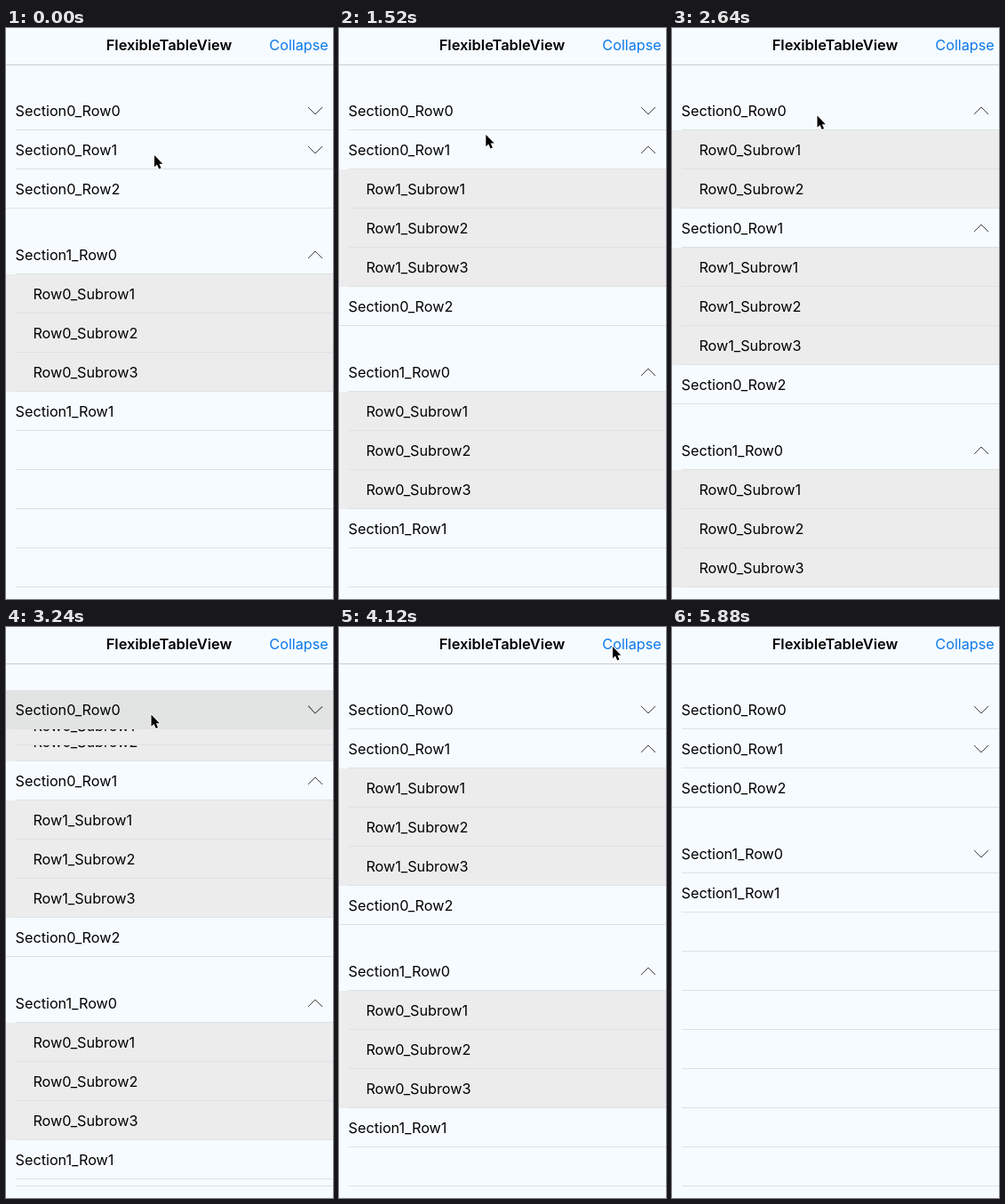
An HTML page with a canvas for the animation above (5920 ms loop, 368 by 642 pixels).

```html
<!DOCTYPE html>
<html lang="en">
<head>
<meta charset="utf-8">
<title>FlexibleTableView</title>
<style>
html, body { margin: 0; width: 100%; height: 100%; overflow: hidden; background: #f6fbff; }
canvas { display: block; }
</style>
</head>
<body>
<canvas id="stage" width="368" height="642"></canvas>
<script>
const ctx = document.getElementById('stage').getContext('2d');
const W = 368, H = 642, ROW = 44, LOOP = 5920;
const BG = '#f6fbff', GRAY = '#ececec', LINE = '#dde1e5', INK = '#000';
const FAMILY = 'Inter, "Liberation Sans", sans-serif';
const FONT = '16.2px ' + FAMILY, BOLD = '600 16.4px ' + FAMILY;

// A row with children opens at `on` and closes at `off`.
const sections = [
  [
    { subs: 2, on: 2162, off: 3075, taps: [2162, 3075] },
    { subs: 3, on: 547, off: 4541, taps: [547] },
    { subs: 0 }
  ],
  [
    { subs: 3, on: -1000, off: 4541, taps: [] },
    { subs: 0 }
  ]
];

// Pointer tip: time, x, y
const path = [
  [0, 167, 143], [300, 167, 143], [500, 167, 140], [1300, 167, 140],
  [1750, 163.5, 98.5], [3450, 163.5, 98.5], [4080, 308, 22], [4400, 308, 22],
  [4540, 312, 22], [5000, 312, 22], [5240, 330, -20]
];

const clamp = v => Math.min(1, Math.max(0, v));

// cubic-bezier(.42, 0, .58, 1)
function ease(x) {
  if (x <= 0 || x >= 1) return clamp(x);
  let lo = 0, hi = 1, s = 0.5;
  for (let i = 0; i < 20; i++) {
    s = (lo + hi) / 2;
    const bx = 1.26 * s * (1 - s) ** 2 + 1.74 * s * s * (1 - s) + s ** 3;
    if (bx < x) lo = s; else hi = s;
  }
  return s * s * (3 - 2 * s);
}

const since = (t, start, length) => ease((t - start) / length);
const openness = (row, t) => since(t, row.on, 300) - since(t, row.off, 300);
// The chevron turns faster, and starts back just before the rows close.
const turned = (row, t) => since(t, row.on, 200) - since(t, row.off - 18, 200);

function rect(x, y, w, h, color) {
  ctx.fillStyle = color;
  ctx.fillRect(x, y, w, h);
}

function text(str, x, y, color = INK, font = FONT, align = 'left') {
  ctx.font = font;
  ctx.textAlign = align;
  ctx.fillStyle = color;
  ctx.fillText(str, x, y);
}

function chevron(y, turn) {
  ctx.save();
  ctx.translate(348, y);
  ctx.rotate(Math.PI * turn);
  ctx.beginPath();
  ctx.moveTo(-8, -4);
  ctx.lineTo(0, 4);
  ctx.lineTo(8, -4);
  ctx.strokeStyle = '#444';
  ctx.lineWidth = 1;
  ctx.stroke();
  ctx.restore();
}

// Content sits on the bottom edge, so a squeezed cell cuts its top.
function cell(label, x, top, bottom, color, lineX = 11) {
  ctx.save();
  ctx.beginPath();
  ctx.rect(0, top, W, bottom - top);
  ctx.clip();
  rect(0, top, W, bottom - top, color);
  text(label, x, bottom - 16.2);
  rect(lineX, bottom - 1, W, 1, LINE);
  ctx.restore();
}

function highlight(row, t) {
  const tap = (row.taps || []).find(s => t >= s - 50 && t < s + 420);
  if (tap === undefined) return BG;
  const k = since(t, tap, 420);
  const mix = [246, 247, 248].map(c => Math.round(217 + (c - 217) * k));
  return `rgb(${mix})`;
}

function table(t) {
  let end = 321;
  for (const row of sections.flat())
    if (row.subs && t >= row.on && t < row.off) end += row.subs * ROW;
  for (let y = 628; y > end; y -= ROW) rect(11, y, W, 1, LINE);

  let y = 71;
  sections.forEach((rows, s) => {
    if (s) {
      rect(0, Math.round(y), W, 31, BG);
      y += 30;
    }
    rows.forEach((row, r) => {
      const top = Math.round(y), bottom = top + ROW;
      const edge = s === 0 && r === rows.length - 1 ? 0 : 11;
      cell(`Section${s}_Row${r}`, 10.6, top, bottom, highlight(row, t), edge);
      if (row.subs) chevron(top + 22, turned(row, t));
      y += ROW;
      const height = row.subs ? ROW * openness(row, t) : 0;
      for (let i = 1; i <= row.subs && height > 0; i++, y += height)
        cell(`Row${r}_Subrow${i}`, 30.4, Math.round(y), Math.round(y + height), GRAY);
    });
  });
}

function header(t) {
  rect(0, 0, W, 41, BG);
  rect(0, 41, W, 1, '#c8cccf');
  text('FlexibleTableView', 183.5, 25, INK, BOLD, 'center');
  ctx.globalAlpha = t < 4460 ? 1 : 0.2 + 0.8 * since(t, 4541, 350);
  text('Collapse', 362.7, 25, '#0b78ea', FONT, 'right');
  ctx.globalAlpha = 1;
}

function pointer(t) {
  const next = path.findIndex(p => p[0] > t);
  if (next < 0) return;
  const a = path[next - 1], b = path[next];
  const k = since(t, a[0], b[0] - a[0]);
  ctx.save();
  ctx.translate(a[1] + (b[1] - a[1]) * k, a[2] + (b[2] - a[2]) * k);
  const arrow = new Path2D('M0 0V13.3L3 10.6L5.2 15.6L7.5 14.6L5.4 9.7H9.3Z');
  ctx.lineJoin = 'round';
  ctx.lineWidth = 2;
  ctx.strokeStyle = '#fff';
  ctx.stroke(arrow);
  ctx.fillStyle = INK;
  ctx.fill(arrow);
  ctx.restore();
}

function draw() {
  const t = performance.now() % LOOP;
  rect(0, 0, W, H, BG);
  table(t);
  header(t);
  pointer(t);
  requestAnimationFrame(draw);
}
draw();
</script>
</body>
</html>
```
